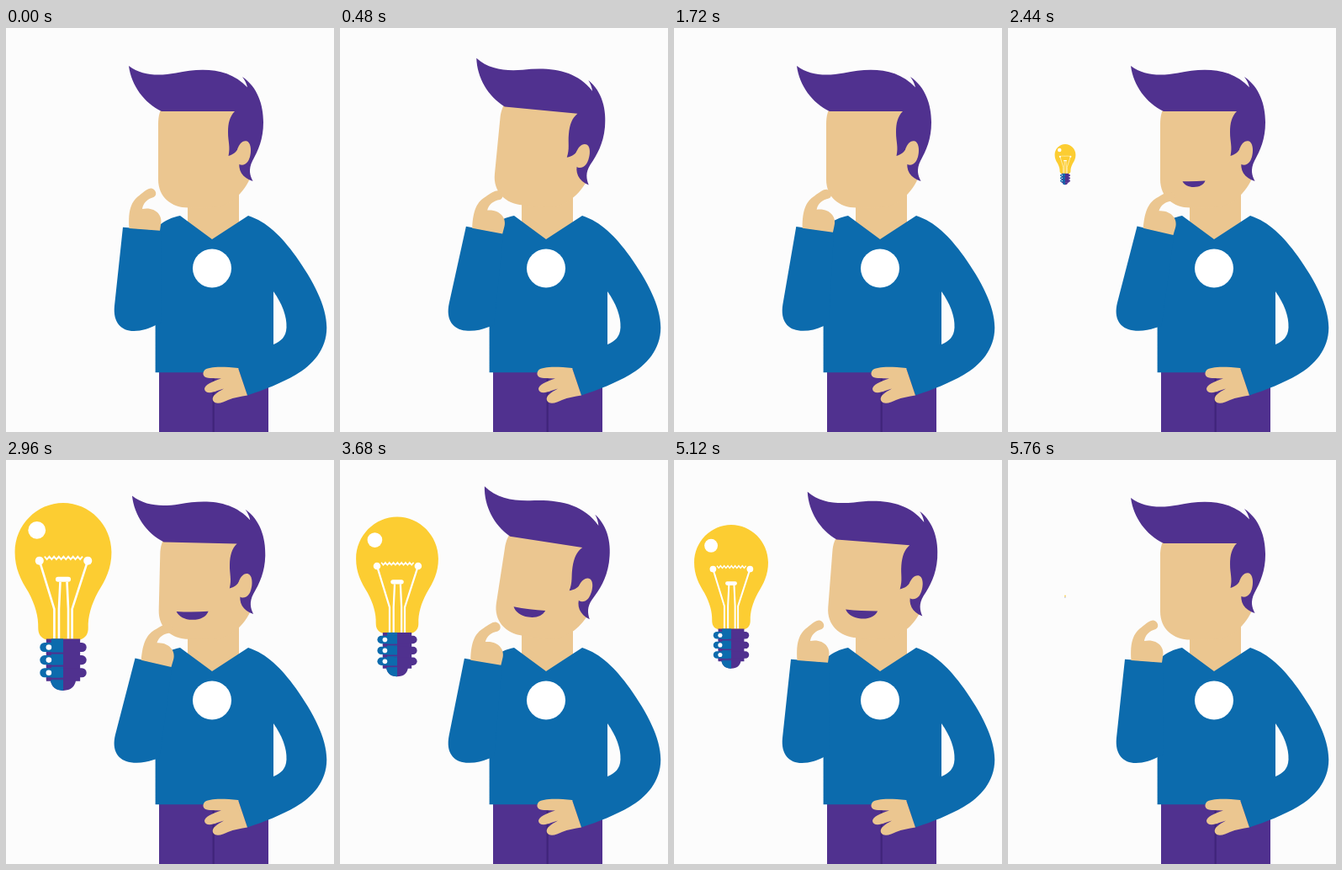
Animation of 390 by 480 pixels, one loop 5.8 s. Source, as an HTML page with a canvas:

```html
<!DOCTYPE html>
<html lang="en">
<head>
<meta charset="utf-8">
<title>Bright idea</title>
<style>
html, body { margin: 0; width: 100%; height: 100%; overflow: hidden; background: #fcfcfc; }
canvas { display: block; width: 390px; height: 480px; }
</style>
</head>
<body>
<canvas id="stage" width="390" height="480"></canvas>
<script>
const LOOP = 5800;
const BLUE = '#0c6bad', PURPLE = '#50318f', SKIN = '#ebc690', YELLOW = '#fccd32', WHITE = '#fff';
const ctx = document.getElementById('stage').getContext('2d');

const shapes = {
  legs: 'M182 405H312V480H182Z',
  neck: 'M216 180H277V232L245 253L216 232Z',
  torso: 'M207 223L245 251L288 223C310 230 328 248 344.500 271C365 300 381.300 330 381.300 356' +
    'C381.300 382 364 401 344.500 412C327 422 308 429.500 287 436.500L276 404L275 409.300H177.600V353L160 340V300L182 235' +
    'C189 228 198 225 207 223Z',
  gap: 'M318 313C328 327 334 342 333.500 356C333 367 327 372 318 376Z',
  restHand: 'M276 404C257 402 241 402 236 406.500C232 412 236 416.500 244 416L256 416.500' +
    'C245 420 236 424 236 429C237 434.500 244 434 251 431L259 428.500C251 433 244 437 246 442.500' +
    'C249 448.500 258 445 264 442C271 439 279 438 287 436.500Z',
  face: 'M187 92C183 98 181 104 181 114V180C181 201 197 214 218 213.500L245 213' +
    'C263 213 280 200 289.500 180L285 95Z',
  hair: 'M146 45C162 57 182 57 202 53.500C233 47 265 47 287 70.500C286 66 284 62 281 58' +
    'C299 70 306 91 306 112C306 132 300 145 293 158C288 168 290 175 293.500 182' +
    'C281 178 275 169 278 156L276 143C274 147 271 150 264.500 152C267 141 264 135 264 124' +
    'C264 113 266 105 272 99H185C164 89 149 68 146 45Z',
  ear: 'M274 149C276 137 282 133 286.500 134.500C292.500 137 292 151 288 158C285 163 279 164 276 161Z',
  mouth: 'M202 181C214.500 181.500 227.500 181 240 180C237.500 187 230 190.500 221 190.500C212 190.500 205 187 202 181Z',
  sleeve: 'M139 236.800L184 240.300L185 350L178 353C170 357 162 360 152 360C137 360 127 350 129 330Z',
  hand: 'M146.500 238C145 216 149 206 158.500 199C164.500 194 169 190 173 190.500C179 192 180 199 175.500 201' +
    'C168 203 163 208 162 215C177 212 187 222 184 234L183 240.800Z',
  glass: 'M48 213C41 211 38.500 206 38.500 199C39 186 35 172 27 157C18 143 11 129 11 110C11 78 37 52 68 52' +
    'C99 52 125 78 125 110C125 129 118 143 109 157C101 172 97 186 97.500 199C97.500 206 95 211 88 213Z',
  wires: 'M40 120L57.500 177V212M97 120L78.500 177V212M64.500 145L63 177V212M72.500 145L74 177V212',
  tip: 'M53 261H83C82 268 77 273 68 273C59 273 54 268 53 261Z',
  tipLeft: 'M53 261H68V273C59 273 54 268 53 261Z'
};
for (const k in shapes) shapes[k] = new Path2D(shapes[k]);

const fill = (name, color) => { ctx.fillStyle = color; ctx.fill(shapes[name]); };

function rect(x, y, w, h, color, r = 0) {
  ctx.fillStyle = color;
  ctx.beginPath();
  ctx.roundRect(x, y, w, h, r);
  ctx.fill();
}

function dot(x, y, r, color) {
  ctx.fillStyle = color;
  ctx.beginPath();
  ctx.arc(x, y, r, 0, Math.PI * 2);
  ctx.fill();
}

function pivot(x, y, deg, scale, draw) {
  ctx.save();
  ctx.translate(x, y);
  ctx.rotate(deg * Math.PI / 180);
  ctx.scale(scale, scale);
  ctx.translate(-x, -y);
  draw();
  ctx.restore();
}

const progress = (t, a, b) => Math.min(1, Math.max(0, (t - a) / (b - a)));
const sine = (t, a, b) => (1 - Math.cos(Math.PI * progress(t, a, b))) / 2;
const swing = (t, a, b, c) => sine(t, a, b) - sine(t, b, c);

const headAngle = t => 8.5 * swing(t, 0, 800, 1600) + 11.5 * swing(t, 2600, 4200, 5800);
const armAngle = t => 8.4 * (swing(t, 0, 720, 1400) + sine(t, 1400, 2100) - sine(t, 3000, 4600));
const smile = t => sine(t, 2160, 2600) - sine(t, 5300, 5700);

function bulbScale(t) {
  if (t < 4800) return 1.24 * sine(t, 2160, 3100) - 0.24 * sine(t, 3100, 3600);
  const drop = 0.75 * sine(t, 4900, LOOP) + 0.25 * progress(t, 4900, LOOP);
  return (1 + 0.08 * sine(t, 4800, 4900)) * (1 - drop);
}

function bulb() {
  fill('glass', YELLOW);
  dot(37, 84, 10.3, WHITE);
  dot(40, 120, 5, WHITE);
  dot(97, 120, 5, WHITE);
  ctx.strokeStyle = WHITE;
  ctx.lineWidth = 2.6;
  ctx.stroke(shapes.wires);
  ctx.lineWidth = 1.8;
  ctx.beginPath();
  for (let i = 0; i <= 16; i++) ctx.lineTo(46 + i * 2.8, i % 2 ? 118.5 : 115);
  ctx.stroke();
  rect(59, 139, 18, 6, WHITE, 3);

  rect(48, 212, 40, 50, PURPLE);
  rect(54, 212, 14, 50, BLUE);
  fill('tip', PURPLE);
  fill('tipLeft', BLUE);
  for (const y of [222, 237, 252]) {
    rect(60, y - 5.5, 35.5, 11, PURPLE, 5.5);
    rect(40.5, y - 5.5, 27.5, 11, BLUE, [5.5, 0, 0, 5.5]);
    rect(48, y + 6, 20, 2, PURPLE);
    dot(51, y, 3.3, WHITE);
  }
}

function body() {
  fill('legs', PURPLE);
  rect(245.5, 409, 2.3, 71, '#40257a');
  fill('neck', SKIN);
  fill('torso', BLUE);
  fill('gap', '#fcfcfc');
  fill('restHand', SKIN);
  dot(245, 285.5, 23, WHITE);
}

function head(t) {
  fill('face', SKIN);
  fill('hair', PURPLE);
  fill('ear', SKIN);
  const s = smile(t);
  if (s > 0) pivot(221, 185, 0, s, () => fill('mouth', PURPLE));
}

function arm() {
  fill('sleeve', BLUE);
  fill('hand', SKIN);
}

function frame(now) {
  const t = now % LOOP;
  ctx.fillStyle = '#fcfcfc';
  ctx.fillRect(0, 0, 390, 480);
  const s = bulbScale(t);
  if (s > 0) pivot(68, 162, 0, s / 1.165, bulb);
  body();
  pivot(248, 207, headAngle(t), 1, () => head(t));
  pivot(155, 335, armAngle(t), 1, arm);
  requestAnimationFrame(frame);
}
requestAnimationFrame(frame);
</script>
</body>
</html>
```
